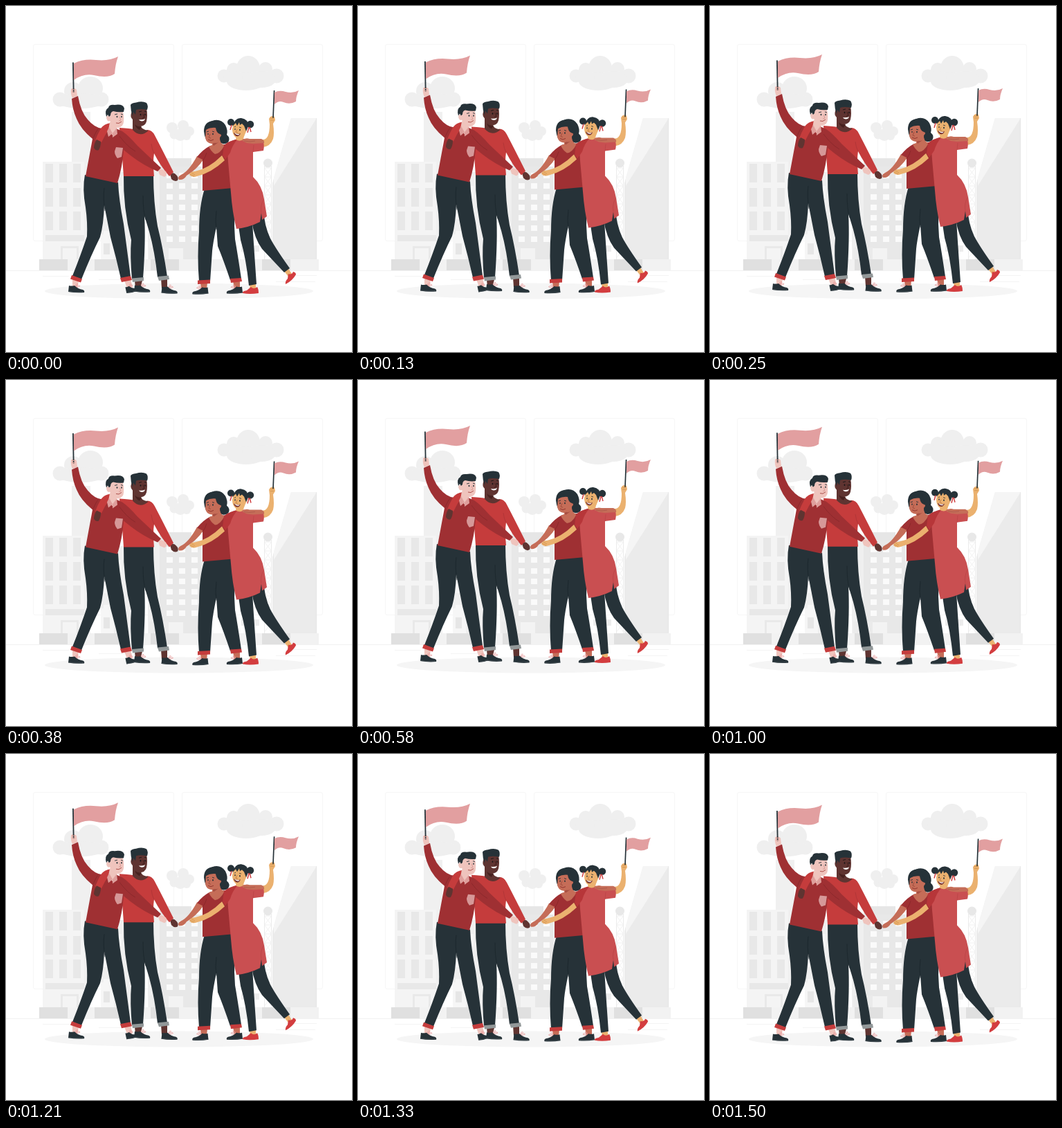
Recreate the animation shown at these times as an HTML page with a canvas. Size 500 by 500 pixels, loop 1540 ms.

```html
<!DOCTYPE html>
<html lang="en">
<head>
<meta charset="utf-8">
<title>Cheering friends</title>
<style>
html, body { margin: 0; width: 100%; height: 100%; overflow: hidden; background: #fff; }
canvas { display: block; width: 100vmin; height: 100vmin; }
</style>
</head>
<body>
<canvas id="stage"></canvas>
<script>
const LOOP = 1540, RISE = 9.2, PEAK = 722, REST = 0.57;
const canvas = document.getElementById('stage');
const ctx = canvas.getContext('2d');
const INK = '#263238', WINE = '#9f3033', RED = '#c53c3c', ROSE = '#c94f51', BLUSH = '#e29fa0';
const PINK = '#efc4bd', BROWN = '#5f3431', TAN = '#c56d58', GOLD = '#ebb16f', CLOUD = '#efefef';

function fill(color, path) {
  ctx.fillStyle = color;
  ctx.fill(new Path2D(path));
}
function line(color, width, path) {
  ctx.strokeStyle = color;
  ctx.lineWidth = width;
  ctx.stroke(new Path2D(path));
}
function rect(color, x, y, w, h) {
  ctx.fillStyle = color;
  ctx.fillRect(x, y, w, h);
}
function oval(color, x, y, rx, ry = rx) {
  ctx.fillStyle = color;
  ctx.beginPath();
  ctx.ellipse(x, y, rx, ry, 0, 0, Math.PI * 2);
  ctx.fill();
}
function grid(color, xs, ys, w, h) {
  for (const x of xs) for (const y of ys) rect(color, x, y, w, h);
}
function cloud(...puffs) {
  for (const puff of puffs) oval(CLOUD, ...puff);
}

function city() {
  line('#f6f6f6', 1, 'M42 55.5H240Q242.500 55.500 242.500 58V337Q242.500 339.500 240 339.500H42Q39.500 339.500 39.500 337V58Q39.500 55.500 42 55.500Z');
  line('#f6f6f6', 1, 'M257 55.5H455Q457.500 55.500 457.500 58V337Q457.500 339.500 455 339.500H257Q254.500 339.500 254.500 337V58Q254.500 55.500 257 55.500Z');

  rect('#f0f0f0', 95, 153, 27, 213);
  rect('#f4f4f4', 53, 225, 60, 141);
  grid('#e8e8e8', [57, 77, 97], [228, 263, 297], 11, 27);
  rect('#e8e8e8', 57, 331, 56, 9);
  rect('#e9e9e9', 79, 347, 26, 19);
  rect('#f4f4f4', 82, 350, 20, 16);

  rect('#efefef', 137, 240, 55, 126);
  grid('#f6f6f6', [141, 157], [260, 290, 325], 10, 18);
  rect('#f6f6f6', 137, 330, 19, 36);
  rect('#e6e6e6', 141, 343, 9, 16);
  rect('#efefef', 205, 232, 80, 134);
  rect('#e6e6e6', 222, 220, 46, 146);
  rect('#e8e8e8', 222, 232, 60, 134);
  grid('#fafafa', [232, 250, 268], [241, 256, 272, 287, 302, 317, 333], 9, 8);
  rect('#ebebeb', 207, 349, 28, 17);
  rect('#f3f3f3', 235, 350, 21, 16);
  rect('#ededed', 340, 346, 26, 9);

  line('#ebebeb', 1, 'M373.500 231V366M383.500 231V366');
  for (let y = 234; y < 362; y += 13) {
    line('#ededed', 0.8, `M373.500 ${y}H383.500L373.500 ${y + 13}M373.500 ${y}L383.500 ${y + 13}`);
  }
  oval('#e8e8e8', 378.5, 227, 6.5);
  fill('#ebebeb', 'M412 162H449V366H385V256Z');
  fill('#f5f5f5', 'M412 162H449L387 260V248Z');
  line('#e4e4e4', 0.7, 'M448.500 162V366');

  rect('#f2f2f2', 48, 366, 404, 16);
  grid('#e0e0e0', [48, 128, 209, 370], [366], 41, 16);
  line('#f1f1f1', 1, 'M0 382.500H500');
  line('#f4f4f4', 1, 'M134 395.500H182M415 389.500H449M390 398.500H447M53 390.500H91');

  cloud([78, 135, 10.5], [97, 123, 13], [122, 119, 18, 17], [138, 135, 10.5], [108, 137, 36, 11]);
  cloud([315, 101, 9.500], [329, 92, 10], [350, 90, 17, 18], [375, 91, 10], [391, 101, 10.500], [347, 109, 28, 13], [370, 106, 20, 12], [328, 102, 14, 8]);
  cloud([240, 176, 8], [256, 173, 8], [265, 181, 7], [243, 186, 6.500], [252, 186, 9], [261, 188, 6]);
  oval('#f5f5f5', 250, 412, 194, 11.5);
}

// A trainer with its sole at y; dir 1 points right, -1 points left.
function shoe(x, y, dir) {
  ctx.save();
  ctx.translate(x, y);
  ctx.scale(dir, 1);
  line('#e99c9c', 0.8, 'M10 -9Q12 -14 14 -12L10 -8Q16 -12 17 -9L11 -7');
  fill(INK, 'M1 -10Q4 -9 9 -10Q14 -5 21 -4Q24 -3 23 0Q11 1 0 -1Z');
  line('#4b5559', 0.6, 'M0 -1.500Q11 0 22 -1');
  ctx.restore();
}

function darkMan() {
  fill(BROWN, 'M186 397H197L194 408H187Z');
  fill(BROWN, 'M224 394L233 393L233 408H225Z');
  shoe(185, 413.500, 1);
  shoe(224.500, 415.500, 1);
  fill(INK, 'M170 243H213Q213 284 219 318Q227 350 233 391L219 392Q215 355 207 326L200 303Q202 340 198 394L182 395Q179 360 181 338Q169 292 170 243Z');
  line('#1b262b', 0.8, 'M198 274Q198 298 202 309');
  fill('#929899', 'M182 393.500L199 392V397L183 399Z');
  fill('#929899', 'M219 391L235 389.500L236 395L221 397Z');

  fill(BROWN, 'M237 243Q242 239 246 244Q250 248 248 252Q244 255 239 250Z');
  fill(RED, 'M164 176Q180 177 184 178Q192 187 204 179Q211 179 215 187Q226 208 242 240L236 246Q223 231 214 213Q212 225 214 246H170Q169 225 166 205Z');
  line('#a93336', 0.7, 'M210 199Q211 208 214 213');
  fill(BROWN, 'M183 160H197L194 171Q195 179 206 180Q194 191 183 179Z');
  fill('#47211f', 'M186 171Q190 175 196 174L193 179Q188 177 186 171Z');
  fill(BROWN, 'M183 147Q190 141 203 148Q205 158 203 167Q201 174 193 174Q186 172 183 164Q179 160 181 155Z');
  fill(INK, 'M180 143Q181 140 188 139.500Q197 137 203 140Q206 144 204 150Q194 148 188 150L187 157L184 153L183 159Q180 151 180 143Z');
  line('#201817', 1, 'M192 153L196 152M200 152L203 153');
  oval('#171516', 194.500, 157, 0.9, 1.2);
  oval('#171516', 201, 157, 0.8, 1.2);
  line('#351715', 0.8, 'M198 156L200 161L197 162');
  fill('#fff', 'M192 164Q197 165 201 163Q200 166.500 196 166.500Q193 166 192 164Z');
}

function paleMan() {
  fill(PINK, 'M96 395L105 398L103 408H96Z');
  fill(PINK, 'M171 397L180 395L183 406L176 410Z');
  shoe(90, 414, 1);
  ctx.save();
  ctx.translate(174.500, 416);
  ctx.rotate(-0.28);
  ctx.scale(0.68, 1);
  shoe(0, 0, 1);
  ctx.restore();
  fill(INK, 'M114 244L162 255Q163 279 170 315L180 391L166 394Q159 363 151 334L142 288Q141 316 136 334Q123 360 109 395L96 390Q108 360 117 333Q118 313 115 291Q110 264 114 244Z');
  line('#172329', 0.7, 'M142 263Q140 278 143 296');
  fill(RED, 'M95 389L110 394.500L108 399.500L93 394.500Z');
  fill(RED, 'M165 393L180 390L182 396L167 399Z');

  fill(PINK, 'M94 120Q98 117 102 121L103 130L96 133Q93 127 94 120Z');
  line(INK, 1.8, 'M96.900 81.500L97.700 125');
  fill(BLUSH, 'M98 83Q112 76 130 78Q149 80 162 73Q158 84 157 98Q147 105 127 100Q112 97 98 107Z');
  line('#e3aaa1', 1, 'M95 121L100 121M95 124H100');

  fill(PINK, 'M219 235Q225 235 231 239Q234 244 229 247L222 244Z');
  fill(WINE, 'M95 134L104 130Q108 153 118 164Q128 176 139 177L150 173L168 181Q177 187 190 202L224 234L219 239Q198 230 180 216L170 208Q168 234 161 256L115 246L125 192Q108 178 102 163Q96 150 95 134Z');
  line('#832629', 0.7, 'M164 188Q175 203 187 210M126 191Q130 181 133 178');
  fill('#d69898', 'M159 204L169 205L167 218L161 220Q157 215 157 210Z');

  fill(RED, 'M151 169Q142 170 137 177Q132 186 129 194L138 197Q143 186 150 176Z');
  fill(BROWN, 'M131 193L137 196Q137 203 134 208Q130 210 127 205Q127 199 131 193Z');

  fill(PINK, 'M150 168H161L160 180L154 187L148 179Z');
  fill('#df9f9c', 'M149 175L154 184L148 189L146 181ZM160 176L161 185L154 190L154 184Z');
  fill(PINK, 'M149 152Q160 144 168 151Q171 158 170 167Q170 174 162 176Q153 174 150 166Q146 168 145 161Q146 157 149 159Z');
  fill(INK, 'M145 160Q142 150 148 147Q149 142 157 143Q169 141 171 148L170 153Q162 154 155 152Q151 153 151 158L149 160L147 157Z');
  line(INK, 0.9, 'M157 157L161 156M166 156L169 157');
  oval(INK, 160.500, 160, 0.9, 1.2);
  oval(INK, 167, 160, 0.8, 1.2);
  line('#d48f89', 0.8, 'M164 160L166 165L163 166');
  line('#a54440', 0.9, 'M159 169Q163 171 167 167');
}

function curlyWoman() {
  fill(TAN, 'M281 399H291L290 410H282Z');
  fill(TAN, 'M328 397H338L338 409H330Z');
  shoe(292.500, 416.500, -1);
  shoe(342, 415.500, -1);
  fill(INK, 'M287 264L326 261Q332 286 330 318L331 337Q335 360 340 394L324 396Q315 369 306 347L304 319Q299 343 298 354L295 398H279Q276 362 279 326Q279 289 287 264Z');
  line('#172329', 0.7, 'M304 296Q302 311 304 323');
  fill(RED, 'M277 396.500L295 395.500V401L277 402Z');
  fill(RED, 'M324 394L340 393L341 398L325 400Z');

  fill(INK, 'M286 181Q286 168 298 166Q310 162 317 172Q321 180 319 186Q325 191 321 197Q314 202 307 196L296 198Q289 196 287 187Z');
  fill(TAN, 'M276 217L286 221Q275 237 261 245Q257 252 250 251Q247 247 253 244Q264 239 276 217Z');
  fill(WINE, 'M295 202L314 200Q327 199 331 216L328 263L284 267Q284 255 284 234V222L276 218Q285 207 295 202Z');
  line('#842528', 0.7, 'M284 224Q288 219 290 212');
  fill(TAN, 'M298 190L309 188Q308 199 316 201Q309 214 302 214Q296 210 293 203L298 201Z');
  fill('#a64f42', 'M297 195Q301 200 307 197L300 202Z');
  fill(TAN, 'M289 179Q293 175 304 174Q306 183 310 184Q313 187 308 191Q304 198 297 199Q289 198 288 190Z');
  fill(INK, 'M288 179Q288 168 299 166Q307 166 308 176Q311 180 311 186L307 184Q304 182 303 176Q296 175 288 179Z');
  line(INK, 0.9, 'M290 182L293 181M298 181L301 182');
  oval(INK, 292, 185, 0.8, 1.1);
  oval(INK, 299, 185, 0.9, 1.2);
  line('#974536', 0.8, 'M295 185L293 190L296 191');
  line('#8d302b', 0.9, 'M292 193Q296 196 300 193');
}

function bunWoman() {
  fill(GOLD, 'M352 402L361 401V409L353 411Z');
  fill(GOLD, 'M401 382L407 378L413 387L408 391Z');
  fill('#d33d3f', 'M342 415Q341 412 348 411L354 406Q358 410 363 406Q365 409 365 415Q352 417 342 415Z');
  fill('#d33d3f', 'M404 402Q403 398 407 394L408 387Q413 389 415 384Q419 385 419 388Q414 397 404 402Z');
  fill(INK, 'M336 318L356 312Q358 345 362 402L351 404Q347 365 339 338Z');
  fill(INK, 'M355 311L372 293Q373 317 382 336Q390 351 410 379L402 385L370 351Q359 336 355 311Z');

  fill(GOLD, 'M380 163Q383 157 388 160L389 165L386 170Q388 184 386 192Q382 203 371 204L371 193Q381 193 381 171Z');
  line(INK, 1.7, 'M387.600 122L386 162');
  fill(BLUSH, 'M388 125Q395 121 404 124Q414 127 423 122Q419 131 419 138Q410 143 401 139Q394 136 388 142Z');
  line('#cf914b', 0.8, 'M382 162H387M382 165H387');

  fill(ROSE, 'M319 198Q331 192 343 192L371 194Q374 201 372 209L357 211L357 247Q370 259 373 279L377 304L370 309L369 299L367 312Q351 320 333 322Q327 298 325 270L321 225Z');
  line('#b74346', 0.7, 'M357 211L358 201M372 280Q367 289 369 299');
  fill('#b73639', 'M315 201Q322 195 335 192Q327 201 324 212L317 222L313 216Z');
  fill(GOLD, 'M312 216L316 223Q297 241 276 246Q269 249 265 244Q266 239 273 239Q293 235 312 216Z');
  line('#d29550', 0.8, 'M268 241L273 244M266 243L272 246');

  fill(TAN, 'M340 194Q346 190 352 192L369 192Q374 194 373 198L357 199L348 198Z');
  line('#a75548', 0.7, 'M344 195L352 196L360 195');
  fill(GOLD, 'M333 184L345 185L343 192Q339 197 332 193Z');
  oval(INK, 325, 168, 5, 5);
  oval(INK, 353, 171, 5.2, 5.2);
  fill(GOLD, 'M328 172Q335 164 346 172L348 179Q346 184 344 188Q337 194 331 189Q327 185 327 178Z');
  fill(INK, 'M327 174Q331 161 340 162Q350 163 350 174L347 181L344 173L341 170L338 172L337 168L334 173L332 169Z');
  line('#cf3f40', 1.5, 'M326 172L324 179M351 175L349 183M352 175L354 182');
  line(INK, 0.8, 'M330 175L332 174M337 175L340 176');
  oval(INK, 331, 178, 0.8, 1.1);
  oval(INK, 338, 179, 0.9, 1.2);
  line('#ba7440', 0.8, 'M334 178L332 182L335 183');
  fill('#6e2627', 'M329 183Q334 186 339 184Q337 189 333 188Q330 187 329 183Z');
  fill('#fff', 'M330 183.600Q334 186 338 184.500L336 186.500Q332 186.500 330 183.600Z');
}

// Steady rise to the peak and steady fall back.
function liftAt(time) {
  const phase = ((time - PEAK) / LOOP % 1 + 1) % 1;
  return RISE * Math.abs(1 - 2 * phase);
}

function draw(now) {
  const scale = canvas.width / 500;
  ctx.setTransform(scale, 0, 0, scale, 0, 0);
  rect('#fff', 0, 0, 500, 500);
  city();
  ctx.translate(0, REST - liftAt(now));
  darkMan();
  paleMan();
  curlyWoman();
  bunWoman();
}

function resize() {
  const side = Math.min(innerWidth, innerHeight) || 500;
  canvas.width = canvas.height = Math.round(side * (devicePixelRatio || 1));
}
function tick() {
  draw(performance.now());
  requestAnimationFrame(tick);
}
addEventListener('resize', resize);
resize();
tick();
</script>
</body>
</html>
```
